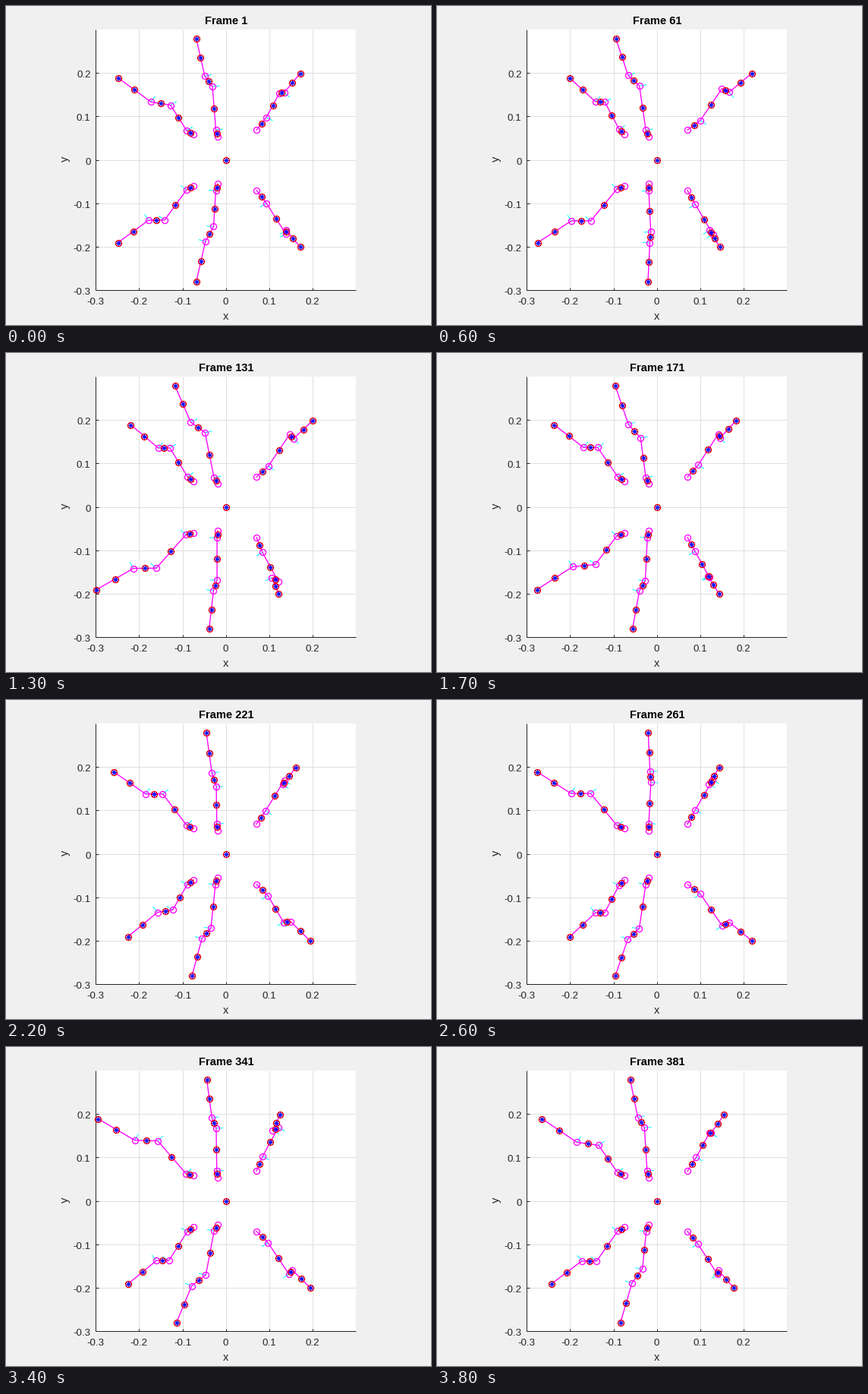
A matplotlib script for the animation above (3.9 s loop, 560 by 420 pixels).

```python
import math

import numpy as np
import matplotlib.pyplot as plt
from matplotlib.animation import FuncAnimation
from matplotlib.patches import Rectangle

W, H, DPI = 560, 420, 100
PX = 72 / DPI                      # one pixel in points
FRAMES, INTERVAL = 39, 100
CENTER = np.array([289.5, 203])
TENTH = 57.2                       # pixels per 0.1 on the axes
LEFT, RIGHT, TOP, BOTTOM = 118, 461, 31, 374
INK = "#262626"

HALF = 19.75                       # frames per swing, and per stance
SPEED = 2.5                        # stance speed, pixels per frame
AMP = SPEED * HALF / 2

# Rest poses: hip, coxa, knee, ankle, foot; x and outward y from the body
REAR = np.array([(-42.5, 33.9), (-51.5, 39), (-80.7, 79), (-101.5, 79), (-142, 108.5)])
MIDDLE = np.array([(-10.5, 31), (-13, 40), (-17.5, 97), (-27.5, 110.7), (-38.7, 159.7)])
FRONT = np.array([(40.5, 39.7), (53.5, 56.5), (79, 96.7), (79, 91.5), (98, 114.2)])

# The legs of each tripod, with -1 for the upper side; the second
# tripod is the mirror image of the first, half a cycle apart.
TRIPOD = [(REAR, -1), (FRONT, -1), (MIDDLE, 1)]
LEGS = [(rest, side * flip, phase)
        for flip, phase in ((1, 0), (-1, HALF)) for rest, side in TRIPOD]


def stride(step):
    """Foot travel and lift, with step counted from the middle of a swing."""
    p = (step + HALF / 2) % (2 * HALF) - HALF / 2
    if p >= HALF / 2:
        return AMP - SPEED * (p - HALF / 2), 0.0
    s = p / HALF + .5
    cubic = s * s * (3 - 2 * s)
    quintic = s ** 3 * (10 - 15 * s + 6 * s * s)
    ease = .4 * cubic + .6 * quintic
    return AMP * (4 * ease - 2 * s - 1), math.cos(math.pi * p / HALF) ** 4


def leg_points(rest, side, step):
    travel, lift = stride(step)
    hip, coxa, knee, ankle, foot = rest

    # the coxa yaws about the hip; each further link takes a share of the travel
    c, s = math.cos(.01 * travel), math.sin(.01 * travel)
    turned = hip + np.array([[c, s], [-s, c]]) @ (coxa - hip)
    thigh_share = .25 - .004 * (knee - coxa)[0]
    knee_x = (turned - coxa)[0] + thigh_share * travel
    ankle_x = knee_x + .32 * travel
    knee = knee + (knee_x, -.06 * travel)
    ankle = ankle + (ankle_x, -.06 * travel)

    # lifting foreshortens the leg towards the hip
    knee = knee + lift * (hip - knee) * (.21, .145)
    ankle = ankle + lift * (hip - ankle) * .05

    pts = np.array([hip, turned, knee, ankle, foot + (travel, 0)])
    return pts * (1, side) + CENTER


def axis_ticks(pts):
    """Short joint axes, square to the thigh and to the last link."""
    segments = []
    for joint, a, b in ((1, 1, 2), (2, 1, 2), (3, 3, 4)):
        dx, dy = pts[b] - pts[a]
        normal = np.array([-dy, dx]) / math.hypot(dx, dy)
        segments += [pts[joint], pts[joint] + 9 * normal, (np.nan, np.nan)]
    return segments


fig = plt.figure(figsize=(W / DPI, H / DPI), dpi=DPI, facecolor="#f0f0f0")
ax = fig.add_axes([0, 0, 1, 1])
ax.set_xlim(0, W)
ax.set_ylim(H, 0)
ax.axis("off")


def text(x, y, s, size=13.33, **kw):
    kw = {"color": INK, "ha": "center", "va": "baseline", **kw}
    return ax.text(x, y, s, fontsize=size * PX, family="Liberation Sans", **kw)


def rule(xs, ys, color, z):
    ax.plot(xs, ys, color=color, lw=PX, zorder=z, solid_capstyle="butt")


def markers(marker, size, color, width, z):
    return ax.plot([], [], ls="none", marker=marker, ms=size * PX, mec=color,
                   mfc="none", mew=width * PX, zorder=z, clip_on=False)[0]


ax.add_patch(Rectangle((LEFT, TOP), RIGHT - LEFT, BOTTOM - TOP + 1,
                       fc="white", ec="none", zorder=0))
for k in range(-3, 3):
    gx, gy = int(290.4 + k * TENTH), int(203 - k * TENTH)
    if k > -3:
        rule((gx, gx), (TOP, BOTTOM), "#dfdfdf", 1)
        rule((LEFT, RIGHT), (gy, gy), "#dfdfdf", 1)
    rule((gx, gx), (BOTTOM - 3.5, BOTTOM), INK, 2)
    rule((LEFT, LEFT + 3.5), (gy, gy), INK, 2)
    label = f"{k / 10:g}"
    text(gx - .4, 393, label)
    text(111.5, gy + 6, label, ha="right")
rule((LEFT, LEFT), (TOP, BOTTOM), INK, 2)
rule((LEFT, RIGHT), (BOTTOM, BOTTOM), INK, 2)
text(290, 413, "x", 14.67)
text(78, 201.7, "y", 14.67, rotation=90, va="center")
title = text(290, 24, "", 14.67, color="black", weight="bold")

axes_line, = ax.plot([], [], color="cyan", lw=PX, zorder=3)
leg_lines = [ax.plot([], [], color="magenta", lw=1.33 * PX, zorder=4)[0]
             for _ in LEGS]
joint_marks = markers("o", 8, "magenta", 1.33, 5)
mass_rings = markers("o", 8, "red", 1.33, 6)
mass_stars = markers((8, 2, 0), 7, "blue", .75, 7)


def draw(i):
    title.set_text(f"Frame {10 * i + 1}")
    joints, masses, ticks = [], [CENTER], []
    for line, (rest, side, phase) in zip(leg_lines, LEGS):
        pts = leg_points(rest, side, i + phase)
        line.set_data(*pts.T)
        joints.extend(pts[:-1])
        masses.extend((pts[:-1] + pts[1:]) / 2)
        masses.append(pts[-1])
        ticks += axis_ticks(pts)
    axes_line.set_data(*np.array(ticks).T)
    joint_marks.set_data(*np.array(joints).T)
    for marks in (mass_rings, mass_stars):
        marks.set_data(*np.array(masses).T)
    return []


anim = FuncAnimation(fig, draw, frames=FRAMES, interval=INTERVAL,
                     repeat=True, repeat_delay=0)
plt.show()
```
